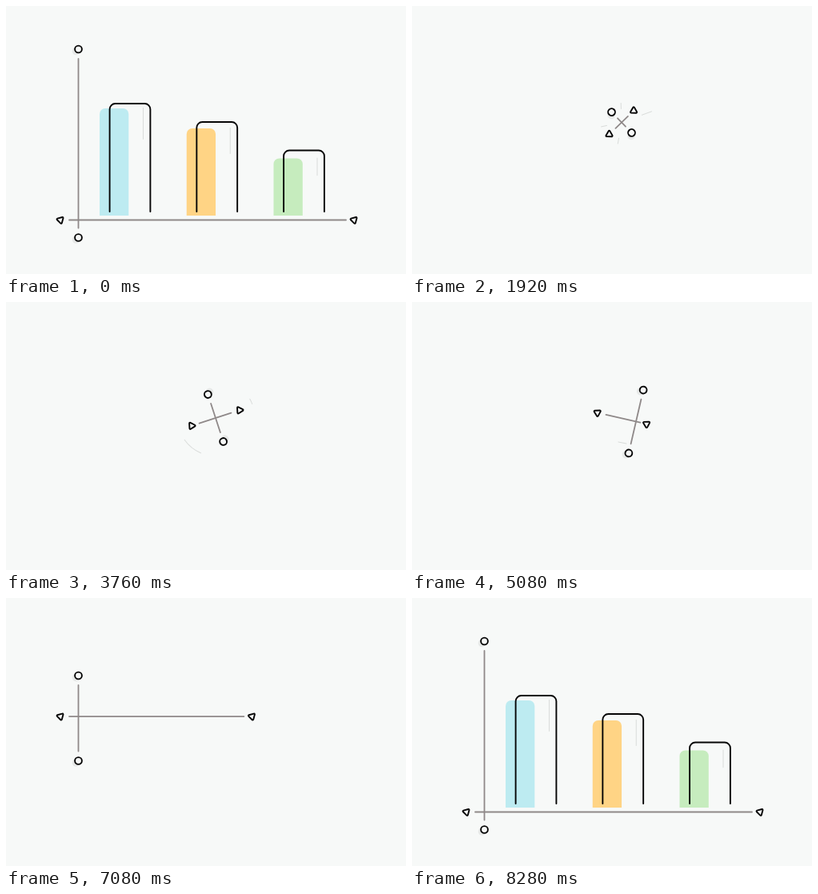
Recreate the animation shown at these times as an HTML page with a canvas. Size 500 px wide and 335 px high, loop 8320 ms.

```html
<!DOCTYPE html>
<html>
<head>
<meta charset="utf-8">
<style>
html, body { margin: 0; width: 100%; height: 100%; overflow: hidden; background: #f7f9f8; }
canvas { display: block; }
</style>
</head>
<body>
<canvas id="stage" width="500" height="335"></canvas>
<script>
const LOOP = 8320, PAPER = '#f7f9f8', INK = '#050505', AXIS = '#8f8989', FAINT = '#d9dcda';
const ctx = document.getElementById('stage').getContext('2d');
const rad = d => d * Math.PI / 180;
const ramp = (t, from, to) => Math.max(0, Math.min(1, (t - from) / (to - from)));
const ease = (t, from, to) => { const u = ramp(t, from, to); return u * u * (3 - 2 * u); };

// Where the axes cross, and where their four ends lie before rotation.
const chart = { x: 90.5, y: 267.5, left: 68, right: 435, top: 54, bottom: 289.5 };
const moves = [
  { from: 960, to: 1860, x: 262, y: 145.5, left: 240.5, right: 283, top: 127.5, bottom: 163.5 },
  { from: 1950, to: 2500, y: 145, left: 230.5, right: 293.5, top: 114, bottom: 176 },
  { from: 4480, to: 5020, x: 280, y: 149.5, top: 109, bottom: 190 },
  { from: 5100, to: 5400, y: 145, top: 97, bottom: 192 },
  { from: 5890, to: 6570, x: 90.5, left: 68 },
  { from: 6990, to: 7480, y: 270, right: 447, bottom: 319 },
  { from: 7600, to: 8050, ...chart }
];

function place(part, t) {
  let v = chart[part];
  for (const move of moves) {
    if (part in move) v += (move[part] - v) * ease(t, move.from, move.to);
  }
  return v;
}

const spin = t => -44 * ease(t, 1250, 1920) - 676 * ramp(t, 2050, 4300)
  + 13 * (ease(t, 4480, 5020) - ease(t, 5100, 5400));

const bars = [['#bdebf1', 139.5], ['#ffd485', 114.5], ['#c6ecbe', 77]];

function stroke(color, width) {
  ctx.strokeStyle = color;
  ctx.lineWidth = width;
  ctx.stroke();
}

function fill(color) {
  ctx.fillStyle = color;
  ctx.fill();
}

function line(x1, y1, x2, y2, color = FAINT, width = 1) {
  ctx.beginPath();
  ctx.moveTo(x1, y1);
  ctx.lineTo(x2, y2);
  stroke(color, width);
}

function arc(x, y, r, from = 0, to = 360) {
  ctx.beginPath();
  ctx.arc(x, y, r, rad(from), rad(to));
}

function arch(x, top, width, bottom) {
  const r = Math.max(0, Math.min(7, bottom - top));
  ctx.beginPath();
  ctx.moveTo(x, bottom);
  ctx.arcTo(x, top, x + width, top, r);
  ctx.arcTo(x + width, top, x + width, bottom, r);
  ctx.lineTo(x + width, bottom);
}

function drawBar([color, height], i, t, base) {
  const start = 7180 + 96 * i, falling = t < 4000;
  const u = falling ? 1 - ramp(t + 60 * i, 1000, 1420) : ramp(t, start, start + 400);
  if (u <= 0) return;
  const x = 117 + 108.75 * i, grow = 1 - (1 - u) ** 3, lift = u ** 1.5;
  arch(x, base - height * grow, 36.3, base - 5.5 * lift);
  fill(color);
  arch(x + 12.6, base - (height + 6 + 2 * i) * grow, 50.8, base - 10.5 * lift);
  stroke(INK, 1.9);
  const reach = falling ? u : ramp(t, start, start + 600);
  const mid = base - 0.865 * height * grow * (0.7 + 0.3 * reach), half = 0.14 * height * reach;
  line(x + 54.5, mid - half, x + 54.5, mid + half);
}

function ring(x, y) {
  arc(x - 3, y + 2.5, 4.8);
  fill('#e7e9e8');
  arc(x, y, 4.4);
  fill(PAPER);
  stroke(INK, 1.9);
}

function triangle(x) {
  ctx.beginPath();
  for (let a = 75; a < 360; a += 120) ctx.lineTo(x + 3.6 * Math.cos(rad(a)), 3.6 * Math.sin(rad(a)));
  ctx.closePath();
  stroke(INK, 3.8);
  fill(PAPER);
}

function drawAxes(t, x, y, bend) {
  const [left, right] = ['left', 'right'].map(part => place(part, t) - x);
  const [top, bottom] = ['top', 'bottom'].map(part => place(part, t) - y);
  const trim = (v, gap) => v - Math.sign(v) * Math.min(gap, Math.abs(v) * 0.6);
  ctx.save();
  ctx.translate(x, y);
  ctx.rotate(rad(spin(t)));
  if (t > 2300 && t < 4100) {
    arc(0, 0, 47.5, 311, 343);
    stroke(FAINT, 1);
    arc(0, 0, 49, 169, 177);
    stroke(FAINT, 1);
  }
  line(trim(left, 11 + 2 * Math.abs(bend)), 0, trim(right, 10), 0, AXIS, 1.8);
  ctx.beginPath();
  ctx.moveTo(bend, trim(top, 12));
  ctx.quadraticCurveTo(-bend, 0, bend, trim(bottom, 12));
  stroke(AXIS, 1.8);
  ring(bend, top);
  ring(bend, bottom);
  triangle(left);
  triangle(right);
  ctx.restore();
}

function drawSpeedLines(t, x, y) {
  const during = (from, to) => t > from && t < to;
  if (during(1760, 2060)) {
    for (const [angle, near, far] of [[-92, 17, 24], [-20, 27, 40], [168, 19, 26], [100, 20, 27]]) {
      const c = Math.cos(rad(angle)), s = Math.sin(rad(angle));
      line(x + near * c, y + near * s, x + far * c, y + far * s);
    }
  }
  if (during(4850, 5250)) line(x - 22, y + 25.5, x - 12, y + 27.5);
  if (during(6160, 6560)) for (const dy of [-6.5, 6.5]) line(x + 36, y + dy, x + 89, y + dy);
  if (during(7250, 7620)) for (const dx of [-6, 5]) line(x + dx, y - 12, x + dx, y - 5);
}

function draw(now) {
  const t = now % LOOP, late = t - 45; // the crossing trails the ends
  const x = place('x', late), y = place('y', late);
  const bend = 0.22 * (place('x', t) - x);
  ctx.fillStyle = PAPER;
  ctx.fillRect(0, 0, 500, 335);
  ctx.lineCap = ctx.lineJoin = 'round';
  bars.forEach((bar, i) => drawBar(bar, i, t, y));
  drawSpeedLines(t, x, y);
  drawAxes(t, x, y, bend);
}

const begin = performance.now();
function tick() {
  draw(performance.now() - begin);
  requestAnimationFrame(tick);
}
tick();
</script>
</body>
</html>
```
